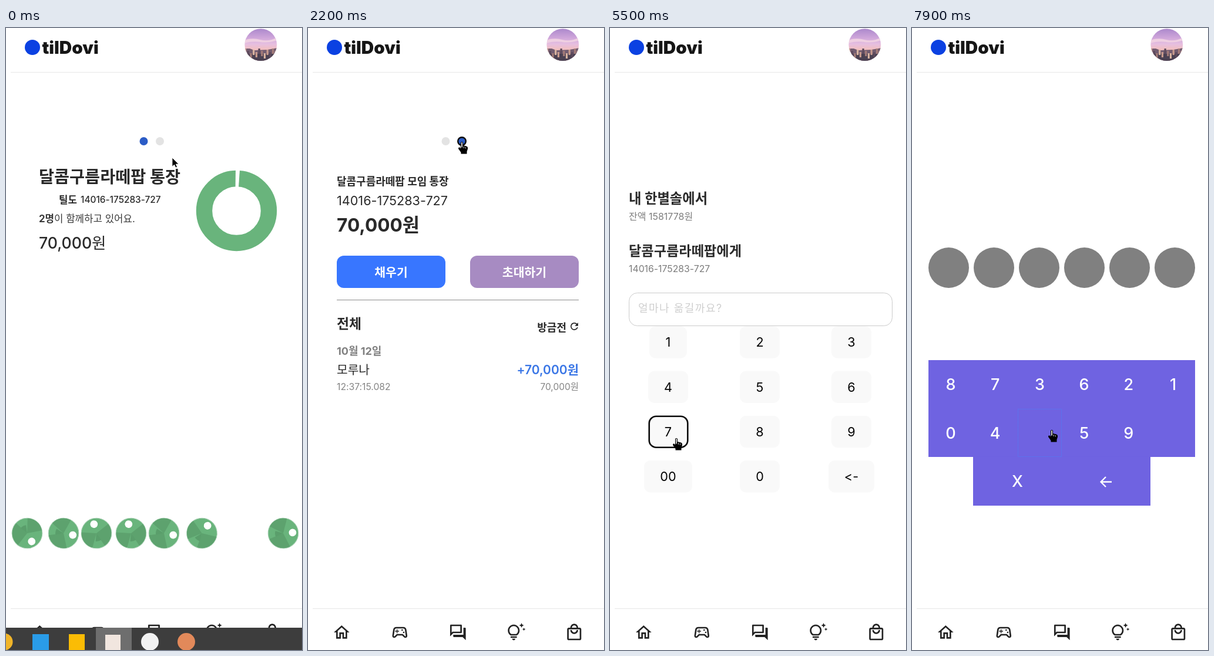
Recreate the animation shown at these times as an HTML page. Size 504 by 1060 pixels, loop 8000 ms.

```html
<!DOCTYPE html>
<html lang="ko">
<head>
<meta charset="utf-8">
<title>모임 통장</title>
<style>
html, body { margin: 0; width: 100%; height: 100%; overflow: hidden; background: #fff; }
svg { display: block; font-family: Inter, 'Noto Sans CJK KR', 'Noto Sans CJK', sans-serif; font-feature-settings: 'calt' 0; }
</style>
</head>
<body>
<svg id="stage" width="504" height="1060" viewBox="0 0 504 1060"></svg>
<script>
const LOOP = 8000, STEP = 100, PAGE_W = 496;
const INK = '#2a2a2a', GRAY = '#7d7d7d', BLUE = '#3876ff', LILAC = '#a78bc2', GREEN = '#69b47c';
const BRAND = 'tilDovi', BANK = '틸도', CLUB = '달콤구름라떼팝', OWNER = '한별솔', MEMBER = '모루나';
const ACCOUNT = '14016-175283-727';

const text = (x, y, size, weight, str, fill = INK, anchor = 'start', extra = '') =>
  `<text x="${x}" y="${y}" font-size="${size}" font-weight="${weight}" fill="${fill}" text-anchor="${anchor}" ${extra}>${str}</text>`;
const rect = (x, y, w, h, fill, r = 0, extra = '') =>
  `<rect x="${x}" y="${y}" width="${w}" height="${h}" rx="${r}" fill="${fill}" ${extra}/>`;
const circle = (x, y, r, fill, extra = '') =>
  `<circle cx="${x}" cy="${y}" r="${r}" fill="${fill}" ${extra}/>`;
const line = (x1, x2, y, color) => `<path d="M${x1} ${y}H${x2}" stroke="${color}"/>`;
const icon = (x, y, scale, d) =>
  `<path transform="translate(${x} ${y}) scale(${scale}) translate(-12 -12)" fill="#222" d="${d}"/>`;
const group = (id, body, extra = '') => `<g id="${id}" ${extra}>${body}</g>`;
const outline = (id, x, y, w, h) =>
  rect(x, y, w, h, 'none', 12, `id="${id}" stroke="#0b0b0b" stroke-width="2.6"`);

const ICONS = {
  home: 'M12 5.69l5 4.5V18h-2v-6H9v6H7v-7.81l5-4.5M12 3L2 12h3v8h6v-6h2v6h6v-8h3L12 3z',
  game: 'M21.58 16.09l-1.09-7.66C20.21 6.46 18.52 5 16.53 5H7.47C5.48 5 3.79 6.46 3.51 8.43l-1.09 7.66C2.2 17.63 3.39 19 4.94 19c.68 0 1.32-.27 1.8-.75L9 16h6l2.25 2.25c.48.48 1.13.75 1.8.75 1.56 0 2.75-1.37 2.53-2.91zm-2.1.72c-.08.09-.21.19-.42.19-.15 0-.29-.06-.39-.16L15.83 14H8.17l-2.84 2.84c-.1.1-.24.16-.39.16-.21 0-.34-.1-.42-.19-.08-.09-.16-.23-.13-.44l1.09-7.66C5.63 7.74 6.48 7 7.47 7h9.06c.99 0 1.84.74 1.98 1.72l1.09 7.66c.03.2-.05.34-.12.43zM9 8H8v2H6v1h2v2h1v-2h2v-1H9zM16 12a1 1 0 1 0 2 0a1 1 0 1 0-2 0M14 9a1 1 0 1 0 2 0a1 1 0 1 0-2 0',
  chat: 'M15 4v7H5.17L4 12.17V4h11m1-2H3c-.55 0-1 .45-1 1v14l4-4h10c.55 0 1-.45 1-1V3c0-.55-.45-1-1-1zm5 4h-2v9H6v2c0 .55.45 1 1 1h11l4 4V7c0-.55-.45-1-1-1z',
  tip: 'M7 20h4c0 1.1-.9 2-2 2s-2-.9-2-2zm-2-1h8v-2H5v2zm11.5-9.5c0 3.82-2.66 5.86-3.77 6.5H5.27C4.16 15.36 1.5 13.32 1.5 9.5 1.5 5.36 4.86 2 9 2s7.5 3.36 7.5 7.5zm-2 0C14.5 6.47 12.03 4 9 4S3.5 6.47 3.5 9.5c0 2.47 1.49 3.89 2.35 4.5h6.3c.86-.61 2.35-2.03 2.35-4.5zm6.87-2.13L20 8l1.37.63L22 10l.63-1.37L24 8l-1.37-.63L22 6l-.63 1.37zM19 6l.94-2.06L22 3l-2.06-.94L19 0l-.94 2.06L16 3l2.06.94L19 6z',
  bag: 'M19 6h-2c0-2.76-2.24-5-5-5S7 3.24 7 6H5c-1.1 0-2 .9-2 2v12c0 1.1.9 2 2 2h14c1.1 0 2-.9 2-2V8c0-1.1-.9-2-2-2zm-7-3c1.66 0 3 1.34 3 3H9c0-1.66 1.34-3 3-3zm7 17H5V8h14v12zm-7-8c-1.66 0-3-1.34-3-3H7c0 2.76 2.24 5 5 5s5-2.24 5-5h-2c0 1.66-1.34 3-3 3z',
  refresh: 'M17.65 6.35C16.2 4.9 14.21 4 12 4c-4.42 0-7.99 3.58-7.99 8s3.57 8 7.99 8c3.73 0 6.84-2.55 7.73-6h-2.08c-.82 2.33-3.04 4-5.65 4-3.31 0-6-2.69-6-6s2.69-6 6-6c1.66 0 3.14.69 4.22 1.78L13 11h7V4l-2.35 2.35z'
};

function header() {
  const towers = Array.from({ length: 12 }, (_, i) =>
    rect(406 + i * 4.7, 35 + (i * 7 % 5) * 2, 3.2, 9, ['#c79a8c', '#5d4a5c', '#a57c78', '#d8b3a0'][i % 4])).join('');
  return line(8, 504, 75.5, '#e8e8e8') + circle(45, 33, 13, '#0b41e2') +
    text(61.5, 44, 29.6, 900, BRAND, '#161616') +
    `<g clip-path="url(#face)">${rect(405, 0, 57, 57, 'url(#sky)')}
      <path d="M405 21q14-5 28-1t29-4v5q-16 5-29 3t-28 2z" fill="#efd0e2"/>
      <path d="M405 35h10l8 3 22-1 17-3v23h-57z" fill="#725c70"/>
      ${rect(405, 44, 57, 13, '#4b4152')}${towers}</g>`;
}

function nav() {
  const names = ['home', 'game', 'chat', 'tip', 'bag'];
  return line(8, 504, 989.5, '#e6e6e6') +
    names.map((n, i) => icon(57.3 + i * 99, 1030, 1.333, ICONS[n])).join('');
}

function ball(x, angle) {
  return `<g transform="translate(${x} 861) rotate(${angle})">
    ${circle(0, 0, 25.8, GREEN, 'stroke="#a9d0b4"')}
    <path d="M0 0L-22 -13A25.5 25.5 0 0 1 8 -24.2ZM0 0L-24 8A25.5 25.5 0 0 0 10 23.4Z" fill="#5d a26e"/>
    <path d="M0 0L-13 -5A14 14 0 0 0 -13 5Z" fill="#5a9e6b"/>
    ${circle(16, 0, 6.4, '#fff')}</g>`.replace('#5d a26e', '#5da26e');
}

function overview() {
  const balls = [[36, 61], [98, 11], [154, -105], [213, -105], [269, 11], [333.5, -53], [472, -4]];
  return text(56, 263.5, 28.3, 700, CLUB + ' 통장') +
    text(90, 299, 16.8, 700, BANK) + text(127, 298, 15.4, 500, ACCOUNT) +
    text(56, 330.5, 16.8, 400, '<tspan font-weight="700">2명</tspan>이 함께하고 있어요.', '#3a3a3a') +
    text(56, 376, 26.6, 500, '70,000원') +
    circle(392.5, 311.5, 55, 'none', `stroke="${GREEN}" stroke-width="27.4"`) +
    '<path d="M391 242H398L396 272H390.6z" fill="#fff"/>' +
    balls.map(b => ball(...b)).join('');
}

function account() {
  return text(49, 268, 18, 700, CLUB + ' 모임 통장') +
    text(49, 302, 21.6, 400, ACCOUNT) + text(49, 347, 31.6, 700, '70,000원') +
    rect(49, 388, 185, 55, BLUE, 12) + outline('fillRing', 50, 389, 183, 53) +
    text(141.5, 423.5, 20.4, 600, '채우기', '#fff', 'middle') +
    rect(276, 388, 185, 55, LILAC, 12) +
    text(368.5, 423.5, 20.5, 600, '초대하기', '#fff', 'middle') +
    line(49, 461, 463.5, '#8c8c8c') + text(49, 512, 22.8, 700, '전체') +
    text(440, 516.5, 18, 700, '방금전', INK, 'end') + icon(453.5, 508.5, .8, ICONS.refresh) +
    text(49, 557, 18, 700, '10월 12일', '#808080') + text(49, 589.5, 20.3, 500, MEMBER) +
    text(461, 590, 21, 600, '+70,000원', '#3b77e6', 'end') +
    text(49, 617, 15.7, 400, '12:37:15.082', '#858585') +
    text(461, 617, 15.5, 400, '70,000원', '#858585', 'end');
}

function transfer() {
  return text(32, 424, 23.3, 700, `내 ${OWNER}에서`) + text(32, 452, 16, 400, '', GRAY, 'start', 'id="balance"') +
    text(32, 513, 23.2, 700, CLUB + '에게') + text(32, 541, 15.8, 400, ACCOUNT, GRAY) +
    rect(32.5, 576.5, 448, 56, '#fff', 14, 'stroke="#cbcbcb"') +
    text(48, 609, 18, 400, '얼마나 옮길까요?', '#cfcfcf', 'start', 'id="hint" letter-spacing="1.5"') +
    text(47, 610.5, 16.6, 400, '', '#111', 'start', 'id="amount"') +
    group('chip', rect(32, 639, 88, 28, LILAC, 10) + text(76, 657, 10.4, 700, '잔액 0원 입력', '#fff', 'middle'));
}

function keypad() {
  const widths = { 1: 64, '00': 82, '&lt;-': 78 };
  const keys = ['1', '2', '3', '4', '5', '6', '7', '8', '9', '00', '0', '&lt;-'];
  return keys.map((k, i) => {
    const x = 99 + i % 3 * 156, y = 508.3 + (i / 3 | 0) * 76.2, w = widths[k] || 68;
    return rect(x - w / 2, y, w, 54.5, '#f9f9f9', 11) + text(x, y + 35, 21.7, 400, k, '#050505', 'middle');
  }).join('') + outline('sevenRing', 66.7, 661.7, 65.6, 53) + outline('zeroRing', 59, 738, 80, 53.5) +
    rect(111, 751, 1.2, 26, '#000', 0, 'id="caret"');
}

function pin() {
  const rows = ['873621', '04 59 '];
  let out = '';
  for (let i = 0; i < 6; i++) out += circle(62.5 + i * 77, 408.5, 34.5, '#808080');
  out += rect(28, 566, 454, 165, '#6f63e1') + rect(104, 730.5, 302, 83.5, '#6f63e1');
  rows.forEach((row, r) => [...row].forEach((d, i) => {
    out += text(66 + i * 75.7, 617 + r * 83, 27, 500, d, '#fff', 'middle');
  }));
  return out + text(179.5, 782, 27, 500, 'X', '#fff', 'middle') +
    '<path d="M340 773.5H322M330 765L321.6 773.5L330 782" fill="none" stroke="#fff" stroke-width="2.4"/>' +
    rect(180.5, 649.5, 74, 81, 'none', 0, 'id="cell" stroke="#5478f2" stroke-dasharray="2 1"');
}

function taskbar() {
  return rect(0, 1022, 504, 38, '#3d3d3d') + rect(153, 1022, 61, 38, '#6e6e6e') +
    circle(-3, 1046, 14.5, '#f0b429') + rect(45, 1033, 28, 27, '#2a9ce8') + rect(107, 1033, 27, 27, '#fbbc05') +
    rect(169, 1034, 26, 26, '#f1e6df') + circle(245, 1046, 15, '#f2f2f2') + circle(307, 1046, 15, '#e2895a');
}

const stage = document.getElementById('stage');
stage.innerHTML = `<defs>
  <linearGradient id="sky" x2="0" y2="1"><stop stop-color="#a986cb"/><stop offset=".3" stop-color="#cfa6da"/><stop offset=".48" stop-color="#e6bfe0"/><stop offset=".64" stop-color="#f2bfc0"/></linearGradient>
  <clipPath id="face">${circle(433.8, 28.6, 27.4, '#000')}</clipPath>
  <clipPath id="view">${rect(8, 76, 496, 913, '#000')}</clipPath></defs>` +
  header() + nav() +
  group('home', group('slide1', overview()) + group('slide2', account()) +
    circle(234.5, 193, 7, '', 'id="dot1"') + circle(262, 193, 7, '', 'id="dot2"') +
    circle(262, 193, 6.8, 'none', 'id="dotRing" stroke="#0b0b0b" stroke-width="2.4"'), 'clip-path="url(#view)"') +
  group('transfer', transfer()) + group('keypad', keypad()) + group('pin', pin()) +
  group('taskbar', taskbar()) +
  group('arrow', '<path d="M0 0V15.3L3.5 12L6 17L8.5 15.8L6.2 11H11Z" fill="#000" stroke="#fff" stroke-width=".8"/>') +
  group('hand', `<path d="M-2 1Q0 -1 2 1V6L8 7.6Q10.4 8.6 10 12L8.5 16.5V20.5H-1.5V18L-6 11.8Q-6 8.8 -3.8 9.4L-2 11.2Z" fill="#000"/>
    <path d="M0 1V9.5" stroke="#fff" stroke-width="1.6"/><path d="M3.4 8V11M6.4 9V11.5" stroke="#fff" stroke-width=".8"/>`);

const el = id => document.getElementById(id);
const show = (id, on) => el(id).setAttribute('display', on ? 'inline' : 'none');
const move = (id, x, y) => el(id).setAttribute('transform', `translate(${x} ${y})`);
const clamp = v => Math.max(0, Math.min(1, v));
const smooth = p => p * p * (3 - 2 * p);

// CSS "ease": cubic-bezier(.25, .1, .25, 1)
function ease(p) {
  let lo = 0, hi = 1, s = p;
  for (let i = 0; i < 24; i++) {
    s = (lo + hi) / 2;
    if (.75 * s * (1 - s) + s ** 3 < p) lo = s; else hi = s;
  }
  return .3 * s * (1 - s) ** 2 + 3 * (1 - s) * s * s + s ** 3;
}

const PATH = [
  [0, 283, 221], [700, 283, 221], [1700, 262, 194], [2200, 262, 194], [2900, 196.5, 405], [3300, 196.5, 405],
  [4000, 428, 474], [4200, 428, 474], [4600, 300, 600], [4800, 300, 600], [5300, 113, 699], [5600, 113, 699],
  [5800, 113, 765], [6200, 113, 765], [6600, 126, 870], [6700, 126, 870], [7200, 215, 740], [7900, 238, 685]
];

function pointer(t) {
  const i = Math.max(1, PATH.findIndex(p => p[0] >= t));
  const [t0, x0, y0] = PATH[i - 1], [t1, x1, y1] = PATH[i];
  const p = smooth(clamp((t - t0) / (t1 - t0)));
  return [x0 + (x1 - x0) * p, y0 + (y1 - y0) * p];
}

function render(ms) {
  const t = Math.floor(ms % LOOP / STEP) * STEP;
  const within = (a, b) => t >= a && t < b;

  move('taskbar', 0, 38 * smooth(clamp(t / 400)));
  show('taskbar', t < 400);

  const shift = -PAGE_W * ease(clamp((t - 1874.5) / 300));
  show('home', t < 3300);
  move('slide1', shift, 0);
  move('slide2', shift + PAGE_W, 0);
  const second = t >= 1900;
  el('dot1').setAttribute('fill', second ? '#e3e3e3' : '#2b5cc6');
  el('dot2').setAttribute('fill', second ? '#2b5cc6' : '#e3e3e3');
  show('dotRing', within(1800, 3000));
  show('fillRing', within(3000, 3300));

  const open = t >= 4600;
  const amount = t >= 6100 ? '70000' : t >= 5900 ? '700' : t >= 5600 ? '7' : '';
  show('transfer', within(3500, 6900));
  move('transfer', 0, open ? -125 : 0);
  el('balance').textContent = `잔액 ${open ? 1581778 : 0}원`;
  el('amount').textContent = amount;
  show('hint', !amount);
  show('chip', !open);
  show('keypad', open && t < 6900);
  show('sevenRing', within(5400, 5800));
  show('zeroRing', within(5800, 6500));
  show('caret', within(6500, 6900));

  show('pin', t >= 7000);
  show('cell', t >= 7900);

  const hand = within(1600, 2300) || within(5200, 6300) || t >= 7000;
  const [x, y] = pointer(t);
  show('hand', hand);
  show('arrow', !hand);
  move(hand ? 'hand' : 'arrow', x, y);
}

const start = performance.now();
function tick() {
  render(performance.now() - start);
  requestAnimationFrame(tick);
}
tick();
</script>
</body>
</html>
```
